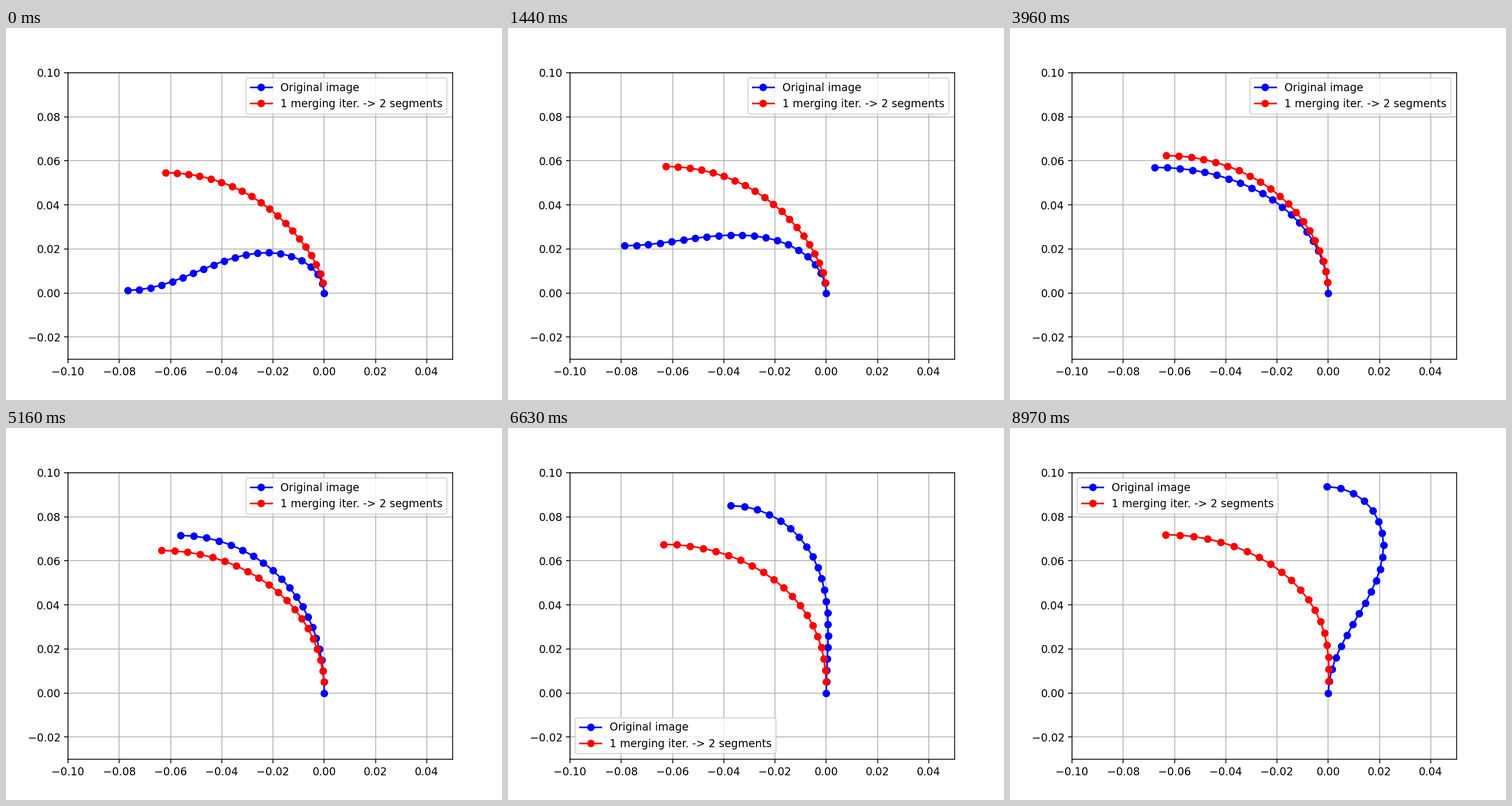
Write a matplotlib script that moves like this. It is 864x648 px and loops after 9000 ms.

```python
import numpy as np
import matplotlib.pyplot as plt
from matplotlib.animation import FuncAnimation

FRAMES, INTERVAL = 300, 30
LINKS = 20
s = (np.arange(LINKS) + 0.5) / LINKS  # link centres along the rod


def mix(a, b, u):
    return a + (b - a) * u


def chain(tilt, length):
    """Points of a rod whose links lean left by tilt degrees."""
    a = np.radians(tilt)
    steps = length / LINKS * np.array([-np.sin(a), np.cos(a)])
    return np.insert(np.cumsum(steps, axis=1), 0, 0, axis=1)


def rods(u):
    """Both rods at loop progress u: upright base, level tip, stretching."""
    length = mix(0.0895, 0.1095, u)
    arc = 90 * s
    blue_bend = mix(252, -255, u) * s * (1 - s)
    red_bend = mix(150, -150, u) * s * (1 - s)**5
    return chain(arc + blue_bend, length), chain(arc + red_bend, length)


fig, ax = plt.subplots(figsize=(6.4, 4.8), dpi=135)
ax.set_xlim(-0.1, 0.05)
ax.set_ylim(-0.03, 0.1)
ax.grid()
blue, = ax.plot([], [], "bo-", label="Original image")
red, = ax.plot([], [], "ro-", label="1 merging iter. -> 2 segments")
ax.legend(loc="best")


def update(i):
    blue_pts, red_pts = rods(i / (FRAMES - 1))
    blue.set_data(*blue_pts)
    red.set_data(*red_pts[:, 1:])  # the red rod has no base point
    return blue, red


anim = FuncAnimation(fig, update, frames=FRAMES, interval=INTERVAL,
                     repeat=True, repeat_delay=0)
plt.show()
```
